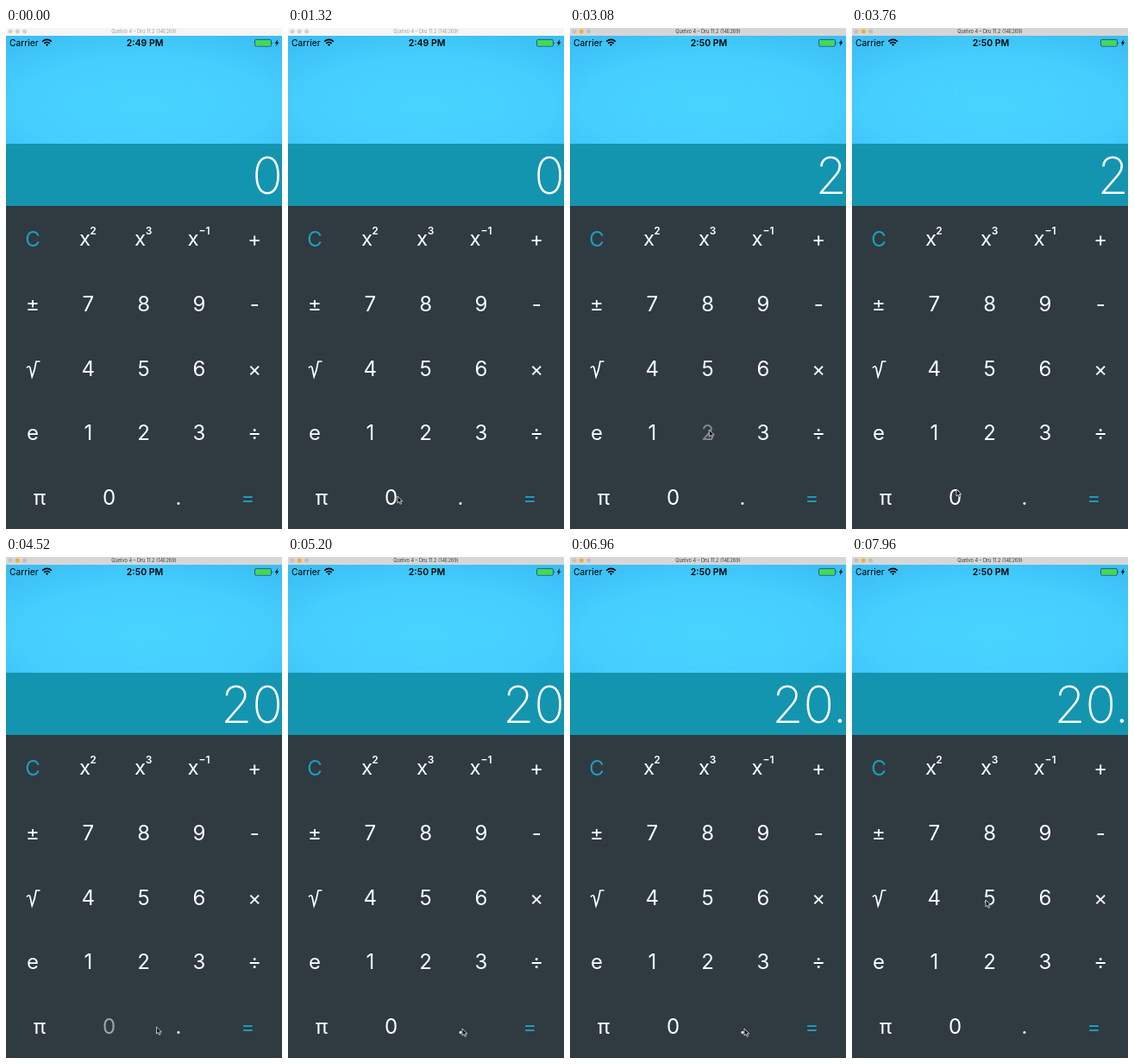
Write an HTML page that moves like this. It is 320 px wide and 580 px high and loops after 8000 ms.

```html
<!DOCTYPE html>
<html lang="en">
<head>
<meta charset="utf-8">
<title>Calculator</title>
<style>
  html, body { margin: 0; width: 100%; height: 100%; overflow: hidden; background: #2f3a41; }
  svg { display: block; width: 100%; height: 100%; font-family: Inter, Roboto, sans-serif; }
  .key { font-size: 24px; fill: #fff; text-anchor: middle; }
  .sup { font-size: 12px; font-weight: 600; }
  .accent { fill: #1c9fbd; }
</style>
</head>
<body>
<svg viewBox="0 0 320 580">
  <defs>
    <radialGradient id="sky" cx="50%" cy="65%" r="75%">
      <stop offset="0" stop-color="#49d4ff"/>
      <stop offset=".6" stop-color="#45cefe"/>
      <stop offset="1" stop-color="#3bbff5"/>
    </radialGradient>
  </defs>
  <rect width="320" height="580" fill="#2f3a41"/>
  <rect y="8" width="320" height="126" fill="url(#sky)"/>
  <rect y="134" width="320" height="72" fill="#1395b0"/>

  <rect id="bar" width="320" height="9"/>
  <circle id="close" cx="5" cy="4" r="2.5"/>
  <circle id="mini" cx="13.3" cy="4" r="2.5"/>
  <circle id="zoom" cx="21.6" cy="4" r="2.5"/>
  <text id="title" x="160" y="6.2" font-size="5.6" text-anchor="middle">Quelvo 4 – Dru 11.2 (14E269)</text>

  <text x="4" y="21" font-size="10.3">Carrier</text>
  <g fill="none" stroke="#000" stroke-width="1.6">
    <path d="M42.2 15.6q5.3-4.4 10.6 0M44.2 17.8q3.3-2.6 6.6 0"/>
    <path d="M47.5 21l-1.7-1.9q1.7-1.2 3.4 0z" fill="#000" stroke="none"/>
  </g>
  <text id="clock" x="161" y="21" font-size="10.5" font-weight="600" text-anchor="middle"></text>
  <rect x="288.5" y="13.4" width="19" height="7.8" rx="1.5" fill="none" stroke="#17363f" stroke-width=".7"/>
  <rect x="289.3" y="14.2" width="17.4" height="6.2" rx=".8" fill="#45d94c"/>
  <path d="M308.6 15.9q1.4 1.4 0 2.8z" fill="#17363f"/>
  <path d="M315.2 13l-3.4 4.8h2l-1 3.4 3.5-4.8h-2.1z"/>

  <text id="display" x="321" y="191.5" font-size="59" font-weight="200" fill="#fff" text-anchor="end"></text>
  <g id="keys"></g>
  <path id="cursor" d="M0 0v8l1.9-1.7 1.3 2.9 1.4-.6-1.3-2.8h2.6z" fill="#111" stroke="#fff" stroke-width=".7"/>
</svg>
<script>
const LOOP = 8000, FADE = 560;
const $ = id => document.getElementById(id);
const keys = {};

function addText(parent, label, x, y, cls) {
  const el = document.createElementNS("http://www.w3.org/2000/svg", "text");
  el.textContent = label;
  el.setAttribute("x", x);
  el.setAttribute("y", y);
  el.setAttribute("class", cls);
  parent.append(el);
  return el;
}

function addRow(labels, first, step, y) {
  labels.forEach((label, i) => {
    if (!label) return;
    const cls = label === "C" || label === "=" ? "key accent" : "key";
    keys[label] = addText($("keys"), label, first + i * step, y, cls);
  });
}

addRow(["C", "", "", "", "+"], 31, 64.3, 252.5);
addRow(["±", "7", "8", "9", "-"], 31, 64.3, 327.5);
addRow(["", "4", "5", "6", "×"], 31, 64.3, 402.5);
addRow(["e", "1", "2", "3", "÷"], 31, 64.3, 477);
addRow(["π", "0", ".", "="], 39, 80.5, 552);

for (const [power, x, dx] of [["2", 91.5, 9.5], ["3", 155.5, 10], ["−1", 217, 13]]) {
  addText($("keys"), "x", x, 252, "key");
  addText($("keys"), power, x + dx, 239.3, "key sup");
}
$("keys").insertAdjacentHTML("beforeend",
  '<path d="M24 393.5Q27 390 28 393.5L30.2 404Q33.5 396 35 386H39.5" fill="none" stroke="#fff" stroke-width="1.7"/>');

const presses = [
  { key: "2", down: 2760, up: 2900, shows: "2" },
  { key: "0", down: 4120, up: 4270, shows: "20" },
  { key: ".", down: 6120, up: 6280, shows: "20." }
];

// time, x, y of the pointer tip
const path = [
  [960, 0, 547], [1240, 127, 542], [1440, 127, 542], [1720, 162, 464],
  [3040, 162, 464], [3560, 122, 533], [3760, 121, 534], [4280, 121, 536],
  [4520, 174.5, 544], [4760, 202, 546], [7000, 202, 546], [7640, 160, 410],
  [7900, 155, 397], [LOOP, 155, 397]
];

const ease = p => p * p * (3 - 2 * p);

function pointerAt(t) {
  const i = path.findIndex(p => p[0] > t);
  if (i < 1) return null;
  const [t0, x0, y0] = path[i - 1], [t1, x1, y1] = path[i];
  const p = ease((t - t0) / (t1 - t0));
  return [x0 + (x1 - x0) * p, y0 + (y1 - y0) * p];
}

function keyOpacity({ down, up }, t) {
  if (t < down) return 1;
  if (t < up) return 0.2;
  return 0.2 + 0.8 * ease(Math.min(1, (t - up) / FADE));
}

function render(t) {
  let value = "0";
  for (const press of presses) {
    if (t >= press.up) value = press.shows;
    keys[press.key].setAttribute("opacity", keyOpacity(press, t));
  }
  $("display").textContent = value;

  const active = t >= presses[0].down;
  $("clock").textContent = active ? "2:50 PM" : "2:49 PM";
  $("bar").setAttribute("fill", active ? "#d6d6d6" : "#f5f5f5");
  $("title").setAttribute("fill", active ? "#3c3c3c" : "#a0a0a0");
  $("close").setAttribute("fill", active ? "#c9bfbd" : "#d0d0d0");
  $("mini").setAttribute("fill", active ? "#f3ad3a" : "#d0d0d0");
  $("zoom").setAttribute("fill", active ? "#bfbfbf" : "#d0d0d0");

  const tip = pointerAt(t);
  $("cursor").setAttribute("visibility", tip ? "visible" : "hidden");
  if (tip) $("cursor").setAttribute("transform", `translate(${tip})`);
}

const start = performance.now();
function tick() {
  render((performance.now() - start) % LOOP);
  requestAnimationFrame(tick);
}
tick();
</script>
</body>
</html>
```
